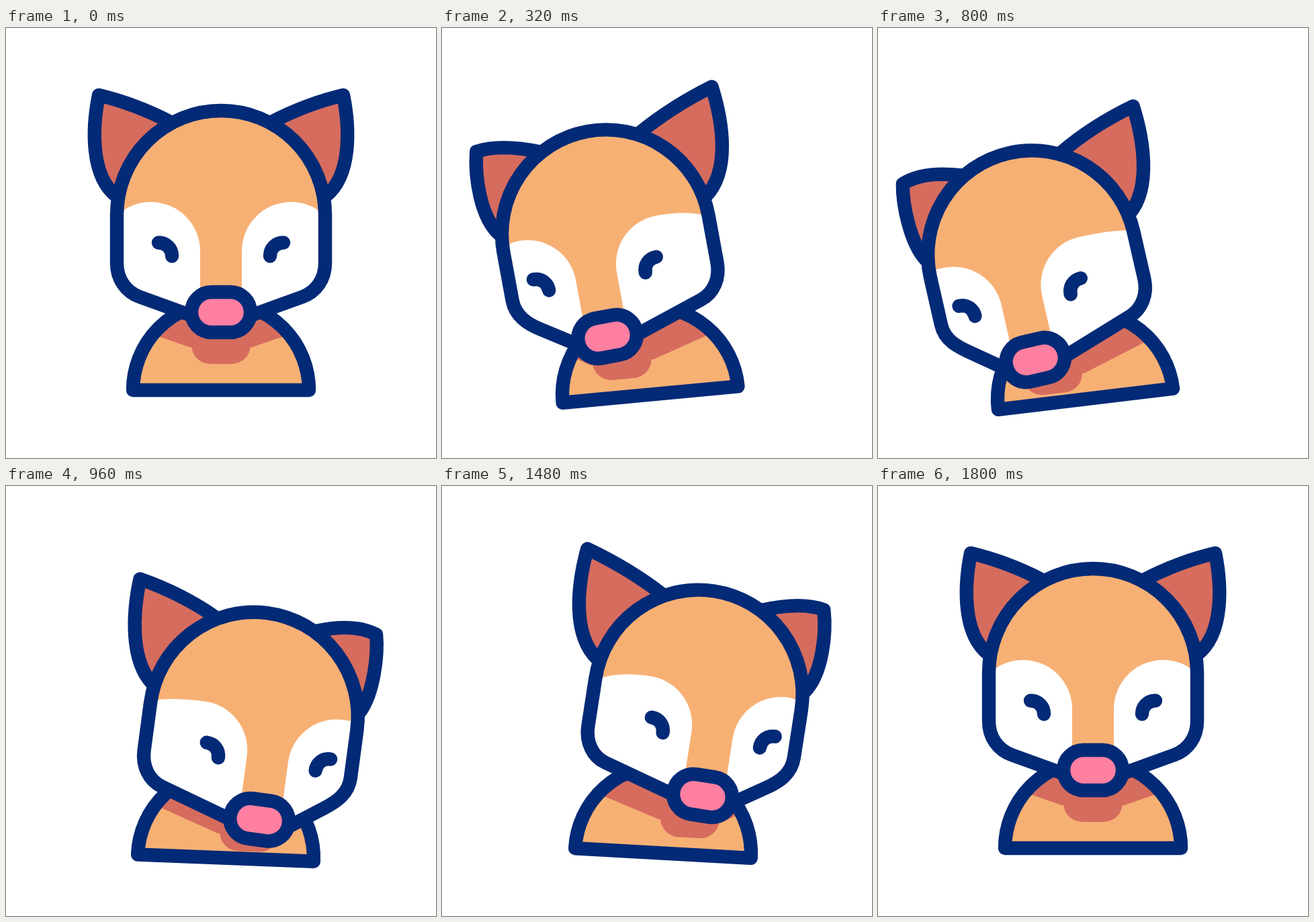
An HTML page with a canvas that plays this animation: 640x640 px, repeating every 2400 ms.

```html
<!DOCTYPE html>
<html lang="en">
<head>
<meta charset="utf-8">
<title>Swaying fox</title>
<style>
html, body { margin: 0; width: 100%; height: 100%; overflow: hidden; background: #fff; }
canvas { display: block; width: 640px; height: 640px; }
</style>
</head>
<body>
<canvas id="stage" width="640" height="640"></canvas>
<script>
const ctx = document.getElementById('stage').getContext('2d');
const NAVY = '#032a76', ORANGE = '#f7b074', RED = '#d66c5e', PINK = '#ff7fa1', WHITE = '#fff';
const LOOP = 2400, PHASE = 600, MID = 320;

// body and head: dx, dy, degrees; face: dx, dy inside the head
const UPRIGHT = { body: [0, 0, 0], head: [0, 0, 0], face: [0, 0] };
const LEFT = { body: [-14.5, 12.4, -8.6], head: [-118, 55.5, -16.85], face: [-41.4, 9.3] };
const RIGHT = { body: [13, 14, 5.25], head: [95.3, 61.2, 14.45], face: [48.3, 5.8] };
const STOPS = [UPRIGHT, LEFT, RIGHT, UPRIGHT, UPRIGHT];

// cubic-bezier(.72, 0, .28, 1)
function ease(u) {
  let lo = 0, hi = 1;
  for (let i = 0; i < 30; i++) {
    const s = (lo + hi) / 2, r = 1 - s;
    if (2.16 * s * r * r + .84 * s * s * r + s ** 3 < u) lo = s; else hi = s;
  }
  return lo * lo * (3 - 2 * lo);
}

// Moves from a to b, with the path bulging to one side.
function travel(a, b, e, bulge) {
  const d = b.map((v, i) => v - a[i]);
  const k = 2 * e * (1 - e) * bulge / (Math.hypot(d[0], d[1]) || 1);
  const p = a.map((v, i) => v + d[i] * e);
  p[0] -= d[1] * k;
  p[1] += d[0] * k;
  return p;
}

function poseAt(time) {
  const i = Math.floor(time / PHASE), a = STOPS[i], b = STOPS[i + 1];
  const e = ease(time / PHASE - i);
  return {
    body: travel(a.body, b.body, e, 3),
    head: travel(a.head, b.head, e, 14),
    face: travel(a.face, b.face, e, 0)
  };
}

function paint(d, fill, line) {
  const path = d instanceof Path2D ? d : new Path2D(d);
  if (fill) { ctx.fillStyle = fill; ctx.fill(path); }
  if (line) { ctx.strokeStyle = NAVY; ctx.stroke(path); }
}

function capsule(x, y, w, h, r) {
  const path = new Path2D();
  path.roundRect(x, y, w, h, r);
  return path;
}

function place([dx, dy, angle], pivotY, drawPart) {
  ctx.save();
  ctx.translate(MID + dx, pivotY + dy);
  ctx.rotate(angle * Math.PI / 180);
  ctx.translate(-MID, -pivotY);
  drawPart();
  ctx.restore();
}

function clipped(path, drawPart) {
  ctx.save();
  ctx.clip(path);
  drawPart();
  ctx.restore();
}

// In all parts below: side is -1 left, 1 right; lead is how far the face
// turns towards that side; nod is 0 upright and about 1 when leaning.

function drawBody({ head, face }, nod) {
  const dome = new Path2D('M189 539A131 131 0 0 1 451 539Z');
  const x = MID + .78 * face[0] + .23 * head[0], y = 500 + .43 * head[1];
  const edgeY = side => 446 + 16 * nod + .3 * side * face[0];
  paint(dome, ORANGE);
  clipped(dome, () => {
    paint(`M190 380V${edgeY(-1)}L${x - 47} ${y - 25}H${x + 47}L450 ${edgeY(1)}V380Z`, RED);
    paint(capsule(x - 44, y - 60, 88, 60, 28), RED);
  });
  paint(dome, null, true);
}

function drawEar(side, turn, nod) {
  const lead = side * turn, drop = .61 * lead + 14 * nod;
  const at = (x, y) => `${MID + side * x} ${y} `;
  paint('M' + at(75, 140) +
        'Q' + at(130, 112 + .25 * drop) + at(182 - .53 * lead - 2 * nod, 100 + drop) +
        'C' + at(192 - .48 * lead - 6 * nod, 150 + .4 * drop) +
        at(194 - .37 * lead - 10 * nod, 220) + at(156, 250) + 'Z', RED, true);
}

function drawMask(side, [dx, dy], nod) {
  const topX = MID + side * 104 + dx, topY = 259 + dy;
  const inner = topX - side * 73, edge = MID + side * 155;
  const endY = 280 - 8 * nod - .14 * side * dx;
  paint(`M${inner} 480V${topY + 73}A73 73 0 0 ${side > 0 ? 1 : 0} ${topX} ${topY}` +
        `Q${edge + .4 * (topX - edge)} ${topY} ${edge} ${endY}V480Z`, WHITE);
}

function drawEye(side, [dx, dy]) {
  const x = d => MID + dx + side * d, y = 319.5 + dy;
  paint(`M${x(93)} ${y}C${x(81)} ${y} ${x(73)} ${y + 9} ${x(73)} ${y + 20}`, null, true);
}

function skullPath([dx, dy]) {
  const chin = [MID + 1.57 * dx, 444 + 1.5 * dy];
  // Each jaw corner runs smoothly into the straight line to the chin.
  const corner = side => {
    const x = MID + side * 121.5, y = 400;
    const k = 21 / Math.hypot(x - chin[0], y - chin[1]);
    return { end: [x, y], bend: [x + (x - chin[0]) * k, y + (y - chin[1]) * k] };
  };
  const l = corner(-1), r = corner(1);
  return new Path2D(`M165 350V278A155 155 0 0 1 475 278V350C475 374 ${r.bend} ${r.end}` +
                    `L${chin}L${l.end}C${l.bend} 165 374 165 350Z`);
}

function drawHead({ face }, nod) {
  const skull = skullPath(face), sides = [-1, 1];
  sides.forEach(side => drawEar(side, face[0], nod));
  paint(skull, ORANGE);
  clipped(skull, () => sides.forEach(side => drawMask(side, face, nod)));
  paint(skull, null, true);
  sides.forEach(side => drawEye(side, face));
  paint(capsule(276 + face[0], 393 + face[1], 88, 60, 30), PINK, true);
}

function frame(now) {
  const pose = poseAt(now % LOOP), nod = pose.head[1] / 58;
  ctx.fillStyle = WHITE;
  ctx.fillRect(0, 0, 640, 640);
  ctx.lineWidth = 20.4;
  ctx.lineCap = ctx.lineJoin = 'round';
  place(pose.body, 539, () => drawBody(pose, nod));
  place(pose.head, 278, () => drawHead(pose, nod));
  requestAnimationFrame(() => frame(performance.now() - start));
}

const start = performance.now();
frame(0);
</script>
</body>
</html>
```
